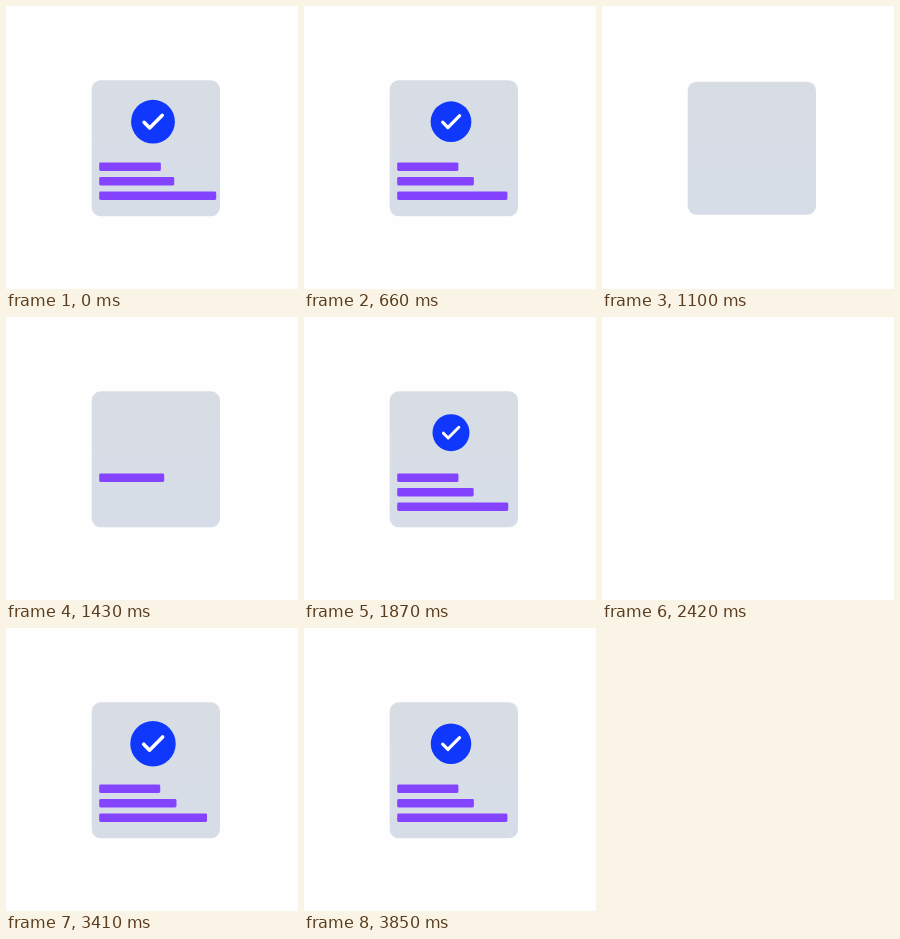
Write an HTML page that moves like this. It is 292 px wide and 283 px high and loops after 3960 ms.

```html
<!DOCTYPE html>
<html lang="en">
<head>
<meta charset="utf-8">
<title>Card with check</title>
<style>
  html, body { margin: 0; width: 100%; height: 100%; overflow: hidden; background: #fefefe; }
  svg { display: block; width: 292px; height: 283px; }
  .bar { fill: #8444ff; }
</style>
</head>
<body>
<svg viewBox="0 0 292 283">
  <defs>
    <linearGradient id="grey" x1="0" y1="0" x2="0" y2="1">
      <stop offset="0" stop-color="#d8dde4"/>
      <stop offset="1" stop-color="#d7dde8"/>
    </linearGradient>
  </defs>
  <rect id="card" x="85.7" y="74.3" width="128.3" height="136" rx="9" fill="url(#grey)"/>
  <rect class="bar" x="93.2" y="156.4" width="61.2" height="8.5" rx="1.4"/>
  <rect class="bar" x="93.2" y="171" width="76.7" height="8.5" rx="1.4"/>
  <rect class="bar" x="93.2" y="185.4" width="110.2" height="8.5" rx="1.4"/>
  <g id="badge">
    <circle r="20.3" fill="#1038fc"/>
    <path d="M-8.3 .5 L-3.1 5.8 L8.6 -6" fill="none" stroke="#fff" stroke-width="3.2"
          stroke-linecap="round" stroke-linejoin="round"/>
  </g>
</svg>
<script>
  const LOOP = 3960, STEP = 110, CYCLE = 1650, CLEAR = 770;
  const card = document.getElementById('card');
  const badge = document.getElementById('badge');
  const bars = [...document.querySelectorAll('.bar')];

  // Elastic ease from 0 to 1
  const spring = (t, period, decay) =>
    t <= 0 ? 0 : 1 - Math.exp(-decay * t) * Math.cos(2 * Math.PI * t / period);

  function place(el, x, y, sx, sy) {
    el.style.visibility = sx * sy > 0 ? 'visible' : 'hidden';
    el.setAttribute('transform',
      `translate(${x} ${y}) scale(${sx} ${sy})` +
      (el === badge ? '' : ` translate(${-x} ${-y})`));
  }

  function draw(ms) {
    const phase = ms % CYCLE;
    const t = phase < CLEAR ? phase + CYCLE : phase;
    place(card, 149.8, 142.3, 1, spring(t - 931.3, 220, 0.0095));
    bars.forEach((bar, i) =>
      place(bar, 93.2, 0, spring(t - 1371.2 - i * STEP, 220, 0.0095), 1));
    const s = spring(t - 1572, 285, 0.008);
    place(badge, 147, 115.7, s, s);
  }

  const start = performance.now();
  function tick() {
    const ms = (performance.now() - start) % LOOP;
    draw(Math.floor(ms / STEP) * STEP);
    requestAnimationFrame(tick);
  }
  tick();
</script>
</body>
</html>
```
